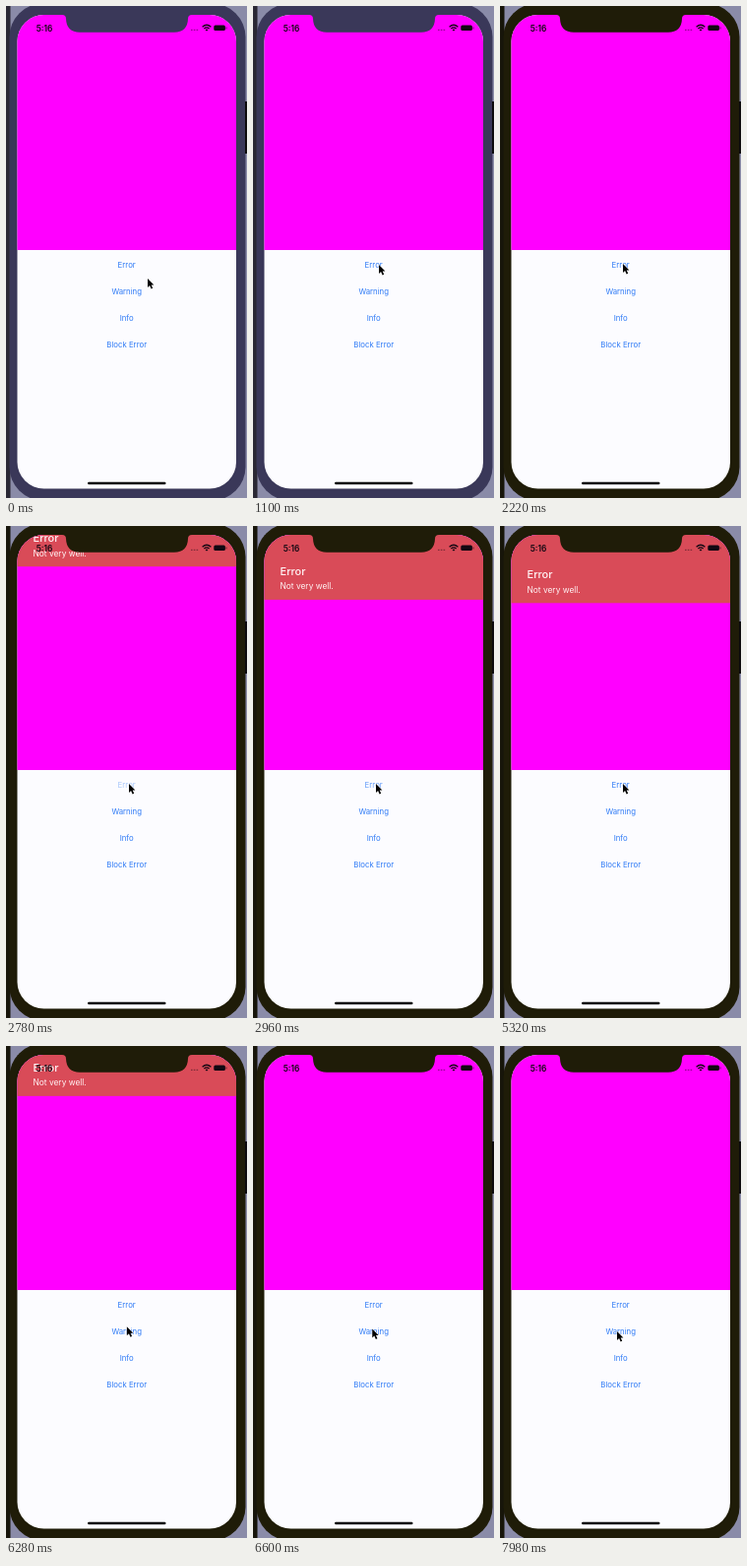
An HTML page that plays this animation: 245x500 px, repeating every 8 s.

```html
<!DOCTYPE html>
<html lang="en">
<head>
<meta charset="utf-8">
<title>Banner message</title>
<style>
  html, body { margin: 0; width: 100%; height: 100%; overflow: hidden; }
  svg { display: block; width: 100vw; height: 100vh; font-family: Inter, "Liberation Sans", sans-serif; }
  .links { font-size: 7.8px; fill: #2f7bf6; text-anchor: middle; }
</style>
</head>
<body>
<svg viewBox="0 0 245 500">
  <defs>
    <clipPath id="screen"><rect x="11.5" y="9" width="222.5" height="481.5" rx="27"/></clipPath>
  </defs>
  <rect width="245" height="500" fill="#8a8ba8"/>
  <rect id="edge" width="4.5" height="500"/>
  <rect id="bezel" x="3.5" y="-2.5" width="240" height="505" rx="34"/>
  <rect x="243" y="97" width="2" height="53" fill="#0c0a0c"/>

  <g clip-path="url(#screen)">
    <rect x="11" y="8" width="224" height="483" fill="#fcfcff"/>
    <rect x="11" y="8" width="224" height="240" fill="#f0f"/>
    <g class="links">
      <text id="errorLink" x="122.7" y="266">Error</text>
      <text x="122.7" y="293">Warning</text>
      <text x="122.7" y="319.7">Info</text>
      <text x="122.7" y="346.7">Block Error</text>
    </g>
    <g id="banner">
      <rect x="11" y="-20" width="224" height="98.3" fill="#d94b58"/>
      <g fill="#fff3f4">
        <text x="27.5" y="53" font-size="11" font-weight="500">Error</text>
        <text x="27.5" y="67.8" font-size="8.4">Not very well.</text>
      </g>
    </g>
    <g fill="#120812">
      <text x="30.7" y="25.5" font-size="8.3" font-weight="600">5:16</text>
      <path d="M188 24.3h1.6M190.8 24.3h1.6M193.6 24.3h1.6" stroke="#120812" stroke-opacity=".55"/>
      <path d="M199.6 21.2Q204 17.4 208.4 21.2M201.4 23Q204 20.8 206.6 23" fill="none" stroke="#120812" stroke-width="1.3"/>
      <path d="M202.6 24.2Q204 23 205.4 24.2L204 25.6Z"/>
      <rect x="211.3" y="19.5" width="11.6" height="5.6" rx="1.5"/>
      <rect x="223.5" y="21.2" width="1" height="2.2" rx=".5" opacity=".6"/>
    </g>
    <rect x="83" y="483.7" width="79.5" height="2.5" rx="1.25" fill="#080808"/>
  </g>
  <path id="notch" d="M57 8V9Q61 9 61 13Q61.5 26.7 75 26.7H171Q184.5 26.7 185 13Q185 9 189 9V8Z"/>
  <path id="cursor" d="M0 0V9L2.1 7.1L3.6 10.5L5.2 9.8L3.7 6.5H6.4Z" fill="#000"
        stroke="#fff" stroke-width=".8" stroke-linejoin="round" paint-order="stroke"/>
</svg>
<script>
  const LOOP = 8000;
  const HIDDEN = -78.5;
  const TONE_CHANGE = 2100;
  const PRESS = 2600, RELEASE = 2680, FADE = 420;
  const HIDE = 6145, HIDE_TIME = 230;
  const PATH = [
    [0, 144, 277], [100, 144, 277], [820, 131, 266], [1100, 128, 263], [1560, 125, 262],
    [5760, 125, 262], [6220, 123, 285], [6400, 122.5, 286], [6900, 119, 290], [LOOP, 119, 290]
  ];

  const $ = id => document.getElementById(id);
  const clamp = v => Math.min(1, Math.max(0, v));
  const smooth = v => v * v * (3 - 2 * v);
  const mix = (a, b, k) => a + (b - a) * k;

  function cursorAt(t) {
    const i = PATH.findIndex(p => p[0] > t);
    const [t0, x0, y0] = PATH[i - 1], [t1, x1, y1] = PATH[i];
    const k = smooth((t - t0) / (t1 - t0));
    return [mix(x0, x1, k), mix(y0, y1, k)];
  }

  // Damped spring in, quadratic ease out.
  function bannerAt(t) {
    if (t < RELEASE) return HIDDEN;
    if (t < HIDE) {
      const s = (t - RELEASE) * 0.0175;
      return HIDDEN * (1 + s) * Math.exp(-s);
    }
    return HIDDEN * clamp((t - HIDE) / HIDE_TIME) ** 2;
  }

  function linkOpacity(t) {
    if (t < PRESS) return 1;
    return mix(0.2, 1, clamp((t - RELEASE) / FADE));
  }

  function draw(t) {
    const early = t < TONE_CHANGE;
    $("bezel").setAttribute("fill", early ? "#3a3859" : "#1f1c08");
    $("notch").setAttribute("fill", early ? "#3a3859" : "#1f1c08");
    $("edge").setAttribute("fill", early ? "#2a2834" : "#17150a");
    $("banner").setAttribute("transform", `translate(0 ${bannerAt(t)})`);
    $("errorLink").setAttribute("opacity", linkOpacity(t));
    $("cursor").setAttribute("transform", `translate(${cursorAt(t)})`);
  }

  const start = performance.now();
  function tick() {
    draw((performance.now() - start) % LOOP);
    requestAnimationFrame(tick);
  }
  tick();
</script>
</body>
</html>
```
